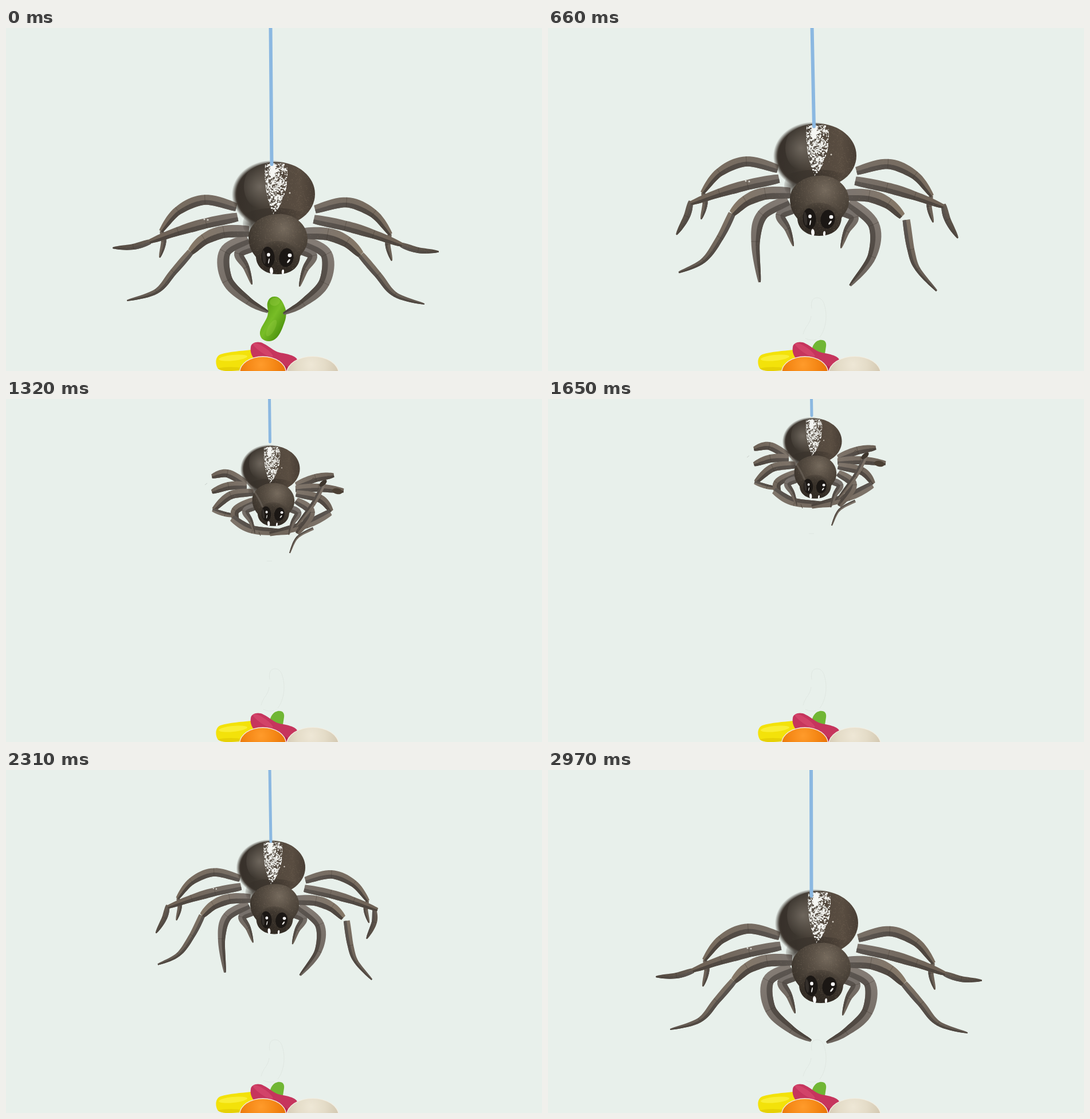
Recreate the animation shown at these times as an HTML page with a canvas. Size 935 by 599 pixels, loop 3.3 s.

```html
<!DOCTYPE html>
<html lang="en">
<head>
<meta charset="utf-8">
<title>Spider and jelly beans</title>
<style>
html, body { margin: 0; width: 100%; height: 100%; overflow: hidden; background: #e8f0eb; }
canvas { display: block; }
</style>
</head>
<body>
<canvas id="stage" width="935" height="599"></canvas>
<script>
const ctx = document.getElementById('stage').getContext('2d');
const STEP = 330;
let seed;

function rand() {
  seed = (seed * 1664525 + 1013904223) >>> 0;
  return seed / 4294967296;
}

function oval(x, y, rx, ry, fill, turn = 0) {
  ctx.beginPath();
  ctx.ellipse(x, y, rx, ry, turn, 0, Math.PI * 2);
  ctx.fillStyle = fill;
  ctx.fill();
}

function shape(d, fill) {
  const p = new Path2D(d);
  ctx.fillStyle = fill;
  ctx.fill(p);
  return p;
}

function ramp(g, colors) {
  colors.forEach((c, i) => g.addColorStop(i / (colors.length - 1), c));
  return g;
}
const glow = (x, y, r, ...colors) => ramp(ctx.createRadialGradient(x, y, 0, x, y, r), colors);
const blend = (x0, y0, x1, y1, ...colors) => ramp(ctx.createLinearGradient(x0, y0, x1, y1), colors);

function inside(p, paint) {
  ctx.save();
  ctx.clip(p);
  paint();
  ctx.restore();
}

function grain(p, x, y, w, h, count) {
  inside(p, () => {
    ctx.fillStyle = 'rgba(160,143,123,.24)';
    while (count--) ctx.fillRect(x + rand() * w, y + rand() * h, 1.1, 1.1);
  });
}

// A limb is a joint path with root, middle and tip widths.
function limb(widths, ...xy) {
  const joints = [];
  for (let i = 0; i < xy.length; i += 2) joints.push([xy[i], xy[i + 1]]);
  return { widths, joints };
}

// The right side mirrors the left with a slight droop.
function mirror({ widths, joints }) {
  return { widths, joints: joints.map(([x, y]) => [941 - x, y + 3 + (471 - x) * .012]) };
}
const pair = l => [l, mirror(l)];

const upper = pair(limb([14, 17, 7], 402,313, 347,300, 300,319, 270,355));
const upperTip = pair(limb([5, 9, 2], 271,354, 275,373, 268,401));
const middle = pair(limb([15, 17, 7], 404,330, 349,341, 300,355, 250,373));
const lower = pair(limb([18, 21, 12], 424,355, 380,356, 346,369, 322,391));
const palp = pair(limb([17, 14, 2], 427,383, 406,394, 419,418, 429,448));

const reach = {
  middle: pair(limb([8, 10, 2], 252,373, 222,382, 186,384)),
  lower: pair(limb([12, 11, 2], 322,391, 292,426, 262,460, 211,476)),
  front: pair(limb([17, 19, 4], 422,368, 382,391, 386,441, 423,477, 457,496))
};

const thinTail = [13, 11, 3], claw = [17, 18, 4];
const dangle = {
  middle: pair(limb([7, 11, 2], 250,369, 243,396, 225,428)),
  lower: [
    limb(thinTail, 322,391, 301,433, 272,473, 229,494),
    limb(thinTail, 626,402, 634,454, 646,488, 679,526)
  ],
  front: [
    limb(claw, 420,368, 375,393, 363,440, 370,511),
    limb(claw, 526,371, 569,410, 566,466, 528,517)
  ]
};
const drawIn = {
  ...dangle,
  middle: [dangle.middle[0], limb([6, 11, 2], 684,375, 684,405, 668,440)]
};

const bent = [11, 14, 7], slim = [5, 8, 3];
const tuckLeft = [
  limb(bent, 418,147, 386,130, 359,135),
  limb(bent, 420,151, 388,152, 359,162),
  limb(bent, 432,163, 392,168, 362,193),
  limb(slim, 360,194, 382,201, 405,205),
  limb(bent, 432,177, 400,195, 404,218),
  limb(bent, 394,208, 430,228, 494,233)
];
const tuckRight = [
  limb(bent, 506,151, 540,138, 572,133),
  limb(bent, 505,157, 545,155, 589,160),
  limb(bent, 506,165, 548,174, 568,196),
  limb(bent, 566,198, 524,219, 460,236),
  limb(bent, 506,177, 532,198, 508,235),
  limb(slim, 556,145, 536,183, 506,222),
  limb([5, 4, 2], 536,226, 508,242, 495,269)
];

function spline(a, b, c, d, t) {
  return b + .5 * t * (c - a + t * (2 * a - 5 * b + 4 * c - d + t * (3 * (b - c) + d - a)));
}

function trace({ widths: [a, b, c], joints }) {
  const last = joints.length - 1, out = [];
  const at = i => joints[Math.max(0, Math.min(last, i))];
  for (let n = 0; n <= last * 10; n++) {
    const i = Math.min(last - 1, Math.floor(n / 10)), s = n / 10 - i, t = n / last / 10;
    const [x, y] = [0, 1].map(k => spline(at(i - 1)[k], at(i)[k], at(i + 1)[k], at(i + 2)[k], s));
    const w = a * (1 - t) * (1 - 2 * t) + 4 * b * t * (1 - t) + c * t * (2 * t - 1);
    out.push([x, y, w * (1 + .05 * Math.sin(s * Math.PI))]);
  }
  return out;
}

function drawLimb(l, side, light = '#7f756b', tip = '#6d6257') {
  const line = trace(l), end = line.length - 1;
  const edge = (i, k) => {
    const p = line[Math.max(0, i - 1)], q = line[Math.min(end, i + 1)];
    const dx = q[0] - p[0], dy = q[1] - p[1], r = line[i][2] / 2 * k * side / (Math.hypot(dx, dy) || 1);
    return [line[i][0] - dy * r, line[i][1] + dx * r];
  };
  const band = (from, to) => {
    const p = new Path2D();
    line.forEach((_, i) => p.lineTo(...edge(i, from)));
    for (let i = end; i >= 0; i--) p.lineTo(...edge(i, to));
    p.closePath();
    return p;
  };
  const span = [line[0][0], line[0][1], line[end][0], line[end][1]];
  const whole = band(-1, 1);
  ctx.fillStyle = blend(...span, light, tip);
  ctx.fill(whole);
  ctx.fillStyle = blend(...span, '#5b5550', '#4b433c');
  ctx.fill(band(.05, 1));
  ctx.strokeStyle = 'rgba(62,54,47,.5)';
  ctx.lineWidth = .8;
  for (let i = 10; i < end; i += 10) {
    ctx.beginPath();
    ctx.moveTo(...edge(i, -1));
    ctx.lineTo(...edge(i, 1));
    ctx.stroke();
  }
  const x = Math.min(span[0], span[2]) - 10, y = Math.min(...line.map(p => p[1])) - 10;
  grain(whole, x, y, Math.abs(span[2] - span[0]) + 20, Math.abs(span[3] - span[1]) + 30, 140);
}

function openLegs(set) {
  [-1, 1].forEach((side, i) => {
    drawLimb(upperTip[i], side, '#6b6157');
    drawLimb(upper[i], side, '#776e65', '#786b5d');
    drawLimb(palp[i], side, '#77716c');
    drawLimb(set.front[i], side, '#837b74', '#6b635c');
    drawLimb(set.lower[i], side, '#7f7366', '#5f564e');
    drawLimb(lower[i], side, '#7c7570', '#857766');
    drawLimb(set.middle[i], side, '#675d53', '#51483f');
    drawLimb(middle[i], side, '#79716a', '#6e6154');
  });
  oval(346, 334, 1.5, 1.5, '#d8d5ce');
  oval(352, 335, 1.5, 1.5, '#d8d5ce');
}

function tuckedLegs() {
  tuckLeft.forEach(l => drawLimb(l, -1));
  tuckRight.forEach(l => drawLimb(l, 1));
  oval(553, 147, 8, 4, '#3e362d', -.7);
  oval(578, 161, 9, 5, '#4b4034', .2);
  ctx.lineWidth = 1;
  ctx.strokeStyle = '#51483e';
  ctx.stroke(new Path2D('M531 143l5-5 4 2M441 232l3 7'));
  ctx.strokeStyle = '#c9cfca';
  ctx.stroke(new Path2D('M347 150l4-3'));
  ctx.strokeStyle = '#dee5e0';
  ctx.stroke(new Path2D('M455 283h9'));
}

function patch() {
  inside(new Path2D('M452 238Q470 234 490 238Q496 290 467 326Q449 290 452 238Z'), () => {
    ctx.fillStyle = '#f3f4f0';
    for (let i = 0; i < 1250; i++) {
      const x = 448 + rand() * 46, y = 234 + rand() * 92, r = .5 + rand() * rand() * 1.6;
      const thin = Math.abs(x - 469) / 30 + Math.abs(y - 270) / 160;
      if (rand() > thin * .7) ctx.fillRect(x - r, y - r, r * 2, r * 2);
    }
  });
  shape('M461 239Q466 236 471 239L469 253Q467 262 462 263Z', '#f5f6f3');
  for (let i = 0; i < 7; i++) oval(464 + i * 2.3 + (i % 2) * 4, 331 + i * 3.2, 1.5, 1.5, '#cfc9bf');
  oval(495, 288, 1.5, 1.5, '#cfc9bf');
}

function face() {
  oval(457, 400, 11.5, 18, '#1b1714', -.08);
  oval(489, 401, 12.5, 16.5, '#1b1714', .15);
  oval(450, 400, 3, 12, 'rgba(76,70,64,.5)', -.1);
  oval(458, 396, 2.8, 3.2, '#fff');
  oval(458.5, 407, 1, 4.5, '#e9e8e5', .2);
  oval(495, 397, 3.4, 3.2, '#fff');
  oval(493, 407, 1.5, 4, '#e9e8e5', .65);
  oval(463, 424, 2.9, 6, '#fff', -.08);
  oval(483, 426, 2, 4.3, '#fff', .08);
}

function body() {
  const soft = 'rgba(61,54,47,0)', dark = '#3d362f';
  ctx.save();
  ctx.translate(464, 291);
  ctx.scale(1.17, 1);
  oval(0, 0, 60, 60, glow(0, 0, 60, ...Array(9).fill(dark), soft));
  ctx.restore();
  oval(429, 342, 16, 20, glow(429, 342, 20, 'rgba(55,49,43,.8)', soft));

  const back = new Path2D();
  back.ellipse(471, 290, 68, 56, 0, 0, Math.PI * 2);
  ctx.fillStyle = blend(402, 0, 540, 0, '#37302a', '#3b352e', '#4b433a', '#54493e', '#594d41', '#473d34');
  ctx.fill(back);
  inside(back, () => {
    oval(443, 277, 28, 38, glow(443, 277, 38, 'rgba(132,124,114,.65)', 'rgba(132,124,114,0)'));
    oval(470, 336, 62, 22, glow(470, 336, 62, 'rgba(40,34,29,.55)', 'rgba(40,34,29,0)'));
  });
  grain(back, 470, 234, 70, 112, 420);
  patch();

  const head = shape('M474 325C502 323 526 343 526 368C526 384 519 389 513 399C512 419 496 430 474 430C452 430 437 418 436 400C429 391 423 382 423 365C423 343 447 325 474 325Z',
    glow(484, 350, 78, '#756a5d', '#5b5146', '#463e35', '#332c25'));
  inside(head, () => oval(474, 403, 38, 31, glow(474, 403, 40, 'rgba(43,37,31,.6)', 'rgba(43,37,31,.5)', 'rgba(43,37,31,0)')));
  grain(head, 423, 325, 103, 105, 620);
  face();
}

function greenBean() {
  const p = shape('M468 469C478 469 482 477 485 484C491 496 489 507 484 519C479 533 472 547 459 547C448 547 442 540 443 531C445 519 457 509 457 497C457 488 454 484 457 477C459 472 463 469 468 469Z',
    blend(448, 490, 488, 515, '#5ba313', '#78bd27', '#519710'));
  inside(p, () => {
    oval(469, 478, 9, 7, 'rgba(157,209,72,.35)', -.3);
    oval(463, 524, 6, 16, 'rgba(160,211,76,.28)', .5);
  });
}

function pile(held) {
  if (!held) {
    shape('M460 570C459 558 464 547 474 545C483 544 486 549 485 556L482 575Z', '#70b634');
    ctx.strokeStyle = '#dce3dd';
    ctx.lineWidth = .7;
    ctx.stroke(new Path2D('M460 490C458 478 461 471 470 471C480 472 482 482 484 491C487 507 484 527 474 540M459 503C459 514 447 523 445 535M449 542Q459 547 468 544'));
  }
  const yellow = shape('M374 570C390 565 410 564 428 562L438 592L408 598C393 599 378 601 370 595C365 589 364 574 374 570Z', '#f3e20a');
  inside(yellow, () => {
    oval(396, 576, 25, 5, 'rgba(255,247,89,.55)', -.1);
    oval(392, 599, 31, 7, 'rgba(218,193,0,.5)');
  });
  const red = shape('M427 557C428 549 440 546 449 551C460 556 466 564 478 567C490 569 505 572 508 579C507 586 498 595 488 599L453 592C440 585 424 575 427 557Z', '#c6355d');
  inside(red, () => {
    oval(448, 562, 21, 5, 'rgba(227,87,124,.4)', .6);
    oval(475, 594, 32, 9, 'rgba(156,27,66,.4)', .35);
  });
  oval(448, 601, 41, 28, '#f2e8dc');
  oval(448, 601, 39.5, 26.5, glow(445, 588, 43, '#ff9b2b', '#f68a18', '#e97509'));
  oval(535, 603, 46, 30, '#f3eee2');
  oval(535, 603, 44.5, 29, glow(532, 588, 49, '#eee7d6', '#e4dcc8', '#d3c8b1'));
}

// Each pose: body centre, body top, scale, thread top x, thread end x and y, legs.
const pose = (x, top, size, x0, x1, y, legs) => ({ x, top, size, x0, x1, y, legs });
const stretched = pose(469, 233, 1, 461.5, 463.5, 239, reach);
const lifted = pose(471, 210, 1, 459, 459.5, 221, reach);
const hanging = pose(468, 166, 1, 460.5, 464, 173, dangle);
const rising = pose(464, 123, .83, 460, 462, 126, drawIn);
const curled = pose(462.5, 81, .715, 459.5, 460.5, 76);
const high = pose(462.5, 33, .715, 459.5, 460, 30);
const cycle = [stretched, lifted, hanging, rising, curled, high, curled, rising, hanging, lifted];

function thread({ x0, x1, y, size }) {
  ctx.strokeStyle = '#8bb8e1';
  ctx.lineWidth = size < 1 ? 5 : 6;
  ctx.lineCap = 'round';
  ctx.beginPath();
  ctx.moveTo(x0, -4);
  ctx.lineTo(x1, y - 1);
  ctx.stroke();
  ctx.lineCap = 'butt';
}

function draw(p) {
  seed = 73;
  ctx.fillStyle = '#e8f0eb';
  ctx.fillRect(0, 0, 935, 599);
  const held = p === stretched;
  pile(held);
  if (held) greenBean();
  if (!p.legs) {
    ctx.save();
    ctx.translate(0, p.top - curled.top);
    tuckedLegs();
    ctx.restore();
  }
  ctx.save();
  ctx.translate(p.x, p.top);
  ctx.scale(p.size, p.size);
  ctx.translate(-469, -233);
  if (p.legs) openLegs(p.legs);
  else palp.forEach((l, i) => drawLimb(l, i ? 1 : -1, '#77716c'));
  body();
  ctx.restore();
  if (!p.legs) {
    ctx.strokeStyle = 'rgba(112,104,95,.6)';
    ctx.lineWidth = 3;
    ctx.stroke(new Path2D(`M412 ${p.top + 58}q20 14 36 50`));
  }
  thread(p);
}

const began = performance.now();
let shown;
function tick() {
  const p = cycle[Math.floor((performance.now() - began) / STEP) % cycle.length];
  if (p !== shown) draw(shown = p);
  requestAnimationFrame(tick);
}
tick();
</script>
</body>
</html>
```
